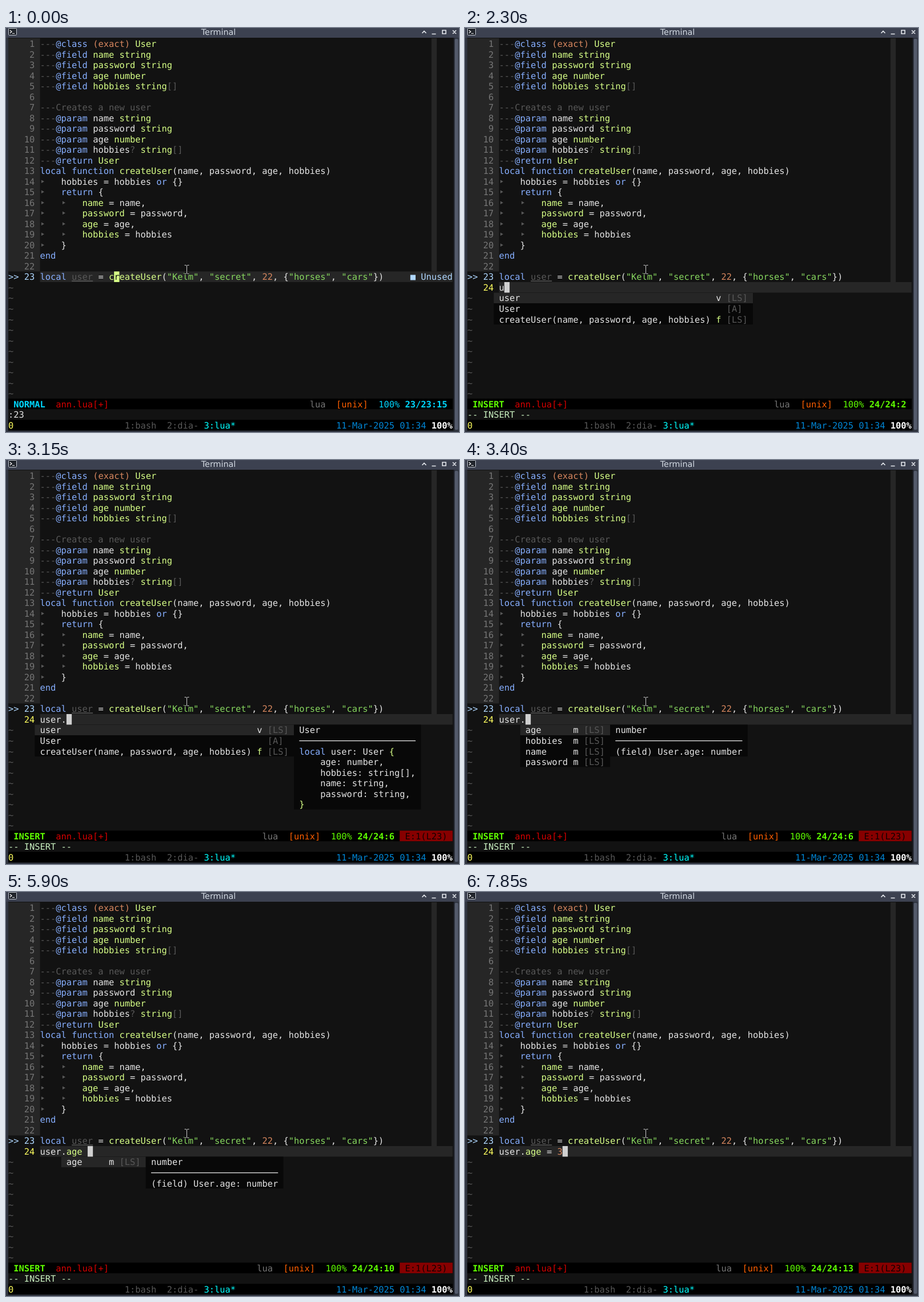
These frames come from a looping animation (793x706 px, 8 s). An HTML page:

```html
<!DOCTYPE html>
<html lang="en">
<head>
<meta charset="utf-8">
<title>Terminal</title>
<style>
html, body { margin: 0; width: 100%; height: 100%; overflow: hidden; background: #2f343f; }
svg { display: block; }
text { font: 15.38px "DejaVu Sans Mono", monospace; white-space: pre; text-rendering: geometricPrecision; }
.title { font: 14.3px "DejaVu Sans", sans-serif; fill: #d3dae3; }
.w { fill: #e4e4e4 } .d { fill: #585858 } .l { fill: #767676 } .b { fill: #87afff }
.g { fill: #d7ff87 } .o { fill: #d7875f } .s { fill: #87d75f } .k { fill: #afd7ff }
.c { fill: #00ffff } .r { fill: #d70000 } .y { fill: #ffff5f } .f { fill: #ff5f00 }
.n { fill: #00d7ff } .i { fill: #5fff00 } .t { fill: #0087d7 } .x { fill: #121212 }
.m { fill: #c9f0c0 } .a { fill: #5fffff } .e { fill: #120000 }
.u { fill: #585858; text-decoration: underline }
.N { fill: #00d7ff; font-weight: bold } .I { fill: #5fff00; font-weight: bold }
.W { fill: #fff; font-weight: bold }
</style>
</head>
<body>
<svg width="793" height="706" viewBox="0 0 793 706">
  <rect width="793" height="706" fill="#2f343f"/>
  <rect width="793" height="17" fill="#3c4150"/>
  <rect x="4" y="17" width="779" height="686.5" fill="#121212"/>
  <rect x="783" y="17" width="2" height="686.5" fill="#1b1d24"/>
  <rect x="785.5" y="19" width="6" height="683" rx="2" fill="#545b6c"/>
  <rect x="4.5" y="0.5" width="14" height="12" rx="1" fill="#20242b" stroke="#c3c8d0"/>
  <path d="M7 4l3 2.5-3 2.5M11 9.5h4" fill="none" stroke="#fff" stroke-width="1.2"/>
  <text class="title" x="372" y="11.5" text-anchor="middle">Terminal</text>
  <path d="M728.5 9l3.5-3.5 3.5 3.5M745.5 10.5h7M764 4h6v6h-6zM782 4l6 6m0-6l-6 6" fill="none" stroke="#e6e9ee" stroke-width="1.6"/>
  <g id="screen"></g>
  <g fill="none">
    <path id="beam" d="M312.500 414.500h2.500l1.500 1 1.500-1h2.500M316.500 415.500v13M312.500 429.500h2.500l1.500-1 1.500 1h2.500" stroke="#111" stroke-width="3"/>
    <use href="#beam" style="stroke:#ddd"/>
    <path d="M312.500 414.500h2.500l1.500 1 1.500-1h2.500M316.500 415.500v13M312.500 429.500h2.500l1.500-1 1.500 1h2.500" stroke="#ccc"/>
  </g>
</svg>
<script>
const CW = 9.26, CH = 18.52, X0 = 4, Y0 = 18, LOOP = 8000;
const screen = document.getElementById('screen');
const px = col => X0 + col * CW, py = row => Y0 + row * CH;

// "§" plus a letter switches the colour class
const plain = s => s.replace(/§./g, '');
const put = (col, row, s) => `<text x="${px(col)}" y="${py(row) + 15}">` +
  ('§w' + s).split('§').slice(1).map(p => `<tspan class="${p[0]}">${p.slice(1)}</tspan>`).join('') + '</text>';
const box = (col, row, cols, rows, fill) =>
  `<rect x="${px(col)}" y="${py(row)}" width="${cols * CW}" height="${rows * CH}" fill="${fill}"/>`;

const CODE = `§d---§b@class §o(exact) §gUser
§d---§b@field §gname string
§d---§b@field §gpassword string
§d---§b@field §gage number
§d---§b@field §ghobbies string§d[]

§d---Creates a new user
§d---§b@param §wname §gstring
§d---§b@param §wpassword §gstring
§d---§b@param §wage §gnumber
§d---§b@param §whobbies§d? §gstring§d[]
§d---§b@return §gUser
§blocal function §gcreateUser§w(name, password, age, hobbies)
§d‣   §whobbies = hobbies §bor§w {}
§d‣   §breturn§w {
§d‣   ‣   §gname§w = name,
§d‣   ‣   §gpassword§w = password,
§d‣   ‣   §gage§w = age,
§d‣   ‣   §ghobbies§w = hobbies
§d‣   §w}
§bend

§blocal §uuser§w = §gcreateUser§w(§s"Kelm"§w, §s"secret"§w, §o22§w, {§s"horses"§w, §s"cars"§w})`.split('\n');

const CALL = 'createUser(name, password, age, hobbies)';
const menu = (col, width, items, bar) => ({ col, width, items: items.map(s => s.split('|')), bar });
const words = menu(5, 40, ['user|§wv', 'User| |[A]', CALL + '|§gf']);
const fields = menu(10, 8, ['age|§wm', 'hobbies|§wm', 'name|§wm', 'password|§wm']);
const ageOnly = menu(10, 7, ['age|§wm']);
const globals = (col, bar) => menu(col, 40, ['false|§bk', 'function ()~|§aS', 'nil|§bk', 'true|§bk',
  '_ENV|§wv', CALL + '|§gf', 'user|§wv', '_G|§wm', '_VERSION|§gE', 'arg|§wm'], bar);

const userDoc = { col: 54, width: 24, lines: ['User', '', '§blocal §wuser: User §g{', '    age: number,',
  '    hobbies: string[],', '    name: string,', '    password: string,', '§g}'] };
const ageDoc = (col, match) => ({ col, match, width: 26, lines: ['number', '', '(field) User.age: number'] });

// each step changes only the listed parts of the screen state
const STEPS = [
  [0, { line: null, mode: 'NORMAL', hint: true, menu: null, doc: null, err: 0, away: false }],
  [1350, { line: '' }],
  [1400, { mode: 'INSERT' }],
  [2250, { line: 'u', hint: false }],
  [2300, { menu: words }],
  [2350, { line: 'us', menu: null }],
  [2400, { menu: words }],
  [2450, { line: 'use', menu: null }],
  [2550, { menu: words }],
  [2600, { line: 'user' }],
  [2650, { doc: userDoc, err: 1 }],
  [3150, { line: 'user.' }],
  [3200, { menu: null, doc: null }],
  [3300, { menu: fields }],
  [3400, { doc: ageDoc(27) }],
  [4600, { line: 'user.a', menu: ageOnly, doc: ageDoc(27, true), err: 2 }],
  [4700, { line: 'user.§ga', doc: ageDoc(26) }],
  [4950, { line: 'user.§ga§wg', err: 1 }],
  [5150, { line: 'user.§ga§wge' }],
  [5350, { line: 'user.§gage' }],
  [5900, { line: 'user.§gage§w ' }],
  [6100, { menu: null, doc: null }],
  [6750, { line: 'user.§gage§w =', menu: globals(15), away: true }],
  [6900, { menu: globals(15, true), away: false }],
  [7150, { line: 'user.§gage§w = ', menu: globals(16, true) }],
  [7850, { line: 'user.§gage§w = §o3', menu: null }]
];

function drawMenu({ col, width, items, bar }) {
  let out = box(col, 24, width + 9, items.length, '#080808') + box(col, 24, width + 9, 1, '#262626');
  items.forEach(([word, kind, tag = '[LS]'], i) => {
    out += put(col + 1, 24 + i, word) + put(col + width + 2, 24 + i, kind) + put(col + width + 4, 24 + i, '§d' + tag);
  });
  if (bar) out += box(col + width + 9, 24, 1, items.length, '#1c1c1c') + box(col + width + 9, 24, 1, 3, '#444');
  return out;
}

function drawDoc({ col, width, lines, match }) {
  let out = box(col, 24, width, lines.length, '#080808');
  if (match) out += box(col + 7, 26, 1, 1, '#870000');
  out += `<rect x="${px(col + 1)}" y="490" width="${(width - 2) * CW}" height="1.3" fill="#e4e4e4"/>`;
  return out + lines.map((s, i) => put(col + 1, 24 + i, s)).join('');
}

function drawStatus({ line, mode, err }) {
  const normal = mode === 'NORMAL', [bold, thin] = normal ? 'Nn' : 'Ii';
  const pos = line === null ? '23/23:15' : '24/24:' + (plain(line).length + 1);
  const right = `§llua  §f[unix]  §${thin}100% §${bold}${pos}`;
  let out = box(0, 34, 84, 1, '#000') + put(1, 34, `§${bold}${mode}`) + put(9, 34, '§rann.lua[+]') +
    put((err ? 73 : 83) - plain(right).length, 34, right);
  if (err) out += box(74, 34, 10, 1, '#870000') + put(75, 34, `§eE:${err}(L23)`);
  return out + put(0, 35, normal ? ':23' : '§m-- INSERT --');
}

function draw(s) {
  const editing = s.line !== null, row = editing ? 23 : 22;
  let out = box(0, 0, 6, 22, '#262626') + box(80, 0, 1, row, '#262626') + box(6, row, 78, 1, '#262626');
  CODE.forEach((code, i) => {
    out += put(3, i, (i === 22 ? '§k' : '§l') + String(i + 1).padStart(2)) + put(6, i, code);
  });
  out += put(0, 22, '§k>>');
  if (s.hint) out += put(76, 22, '§k■ Unused');
  for (let i = row + 1; i < 34; i++) out += put(0, i, '§d~');
  if (editing) out += put(3, 23, '§y24') + put(6, 23, s.line);
  if (s.menu) out += drawMenu(s.menu);
  if (s.doc) out += drawDoc(s.doc);
  out += drawStatus(s);
  out += box(0, 36, 84, 1, '#000') + put(0, 36, '§y0') + put(22, 36, '§d1:bash  2:dia- §c3:lua*') +
    put(62, 36, '§t11-Mar-2025 01:34 §W100%');
  if (!editing) out += box(20, 22, 1, 1, '#d7ff87') + put(20, 22, '§xr');
  else if (s.away) out += box(12, 35, 1, 1, '#d0d0d0');
  else out += box(6 + plain(s.line).length, 23, 1, 1, '#d0d0d0');
  screen.innerHTML = out;
}

let shown = -1;
function tick() {
  const t = performance.now() % LOOP;
  const past = STEPS.filter(([at]) => at <= t);
  if (past.length !== shown) {
    shown = past.length;
    draw(Object.assign({}, ...past.map(([, change]) => change)));
  }
  requestAnimationFrame(tick);
}
tick();
</script>
</body>
</html>
```
